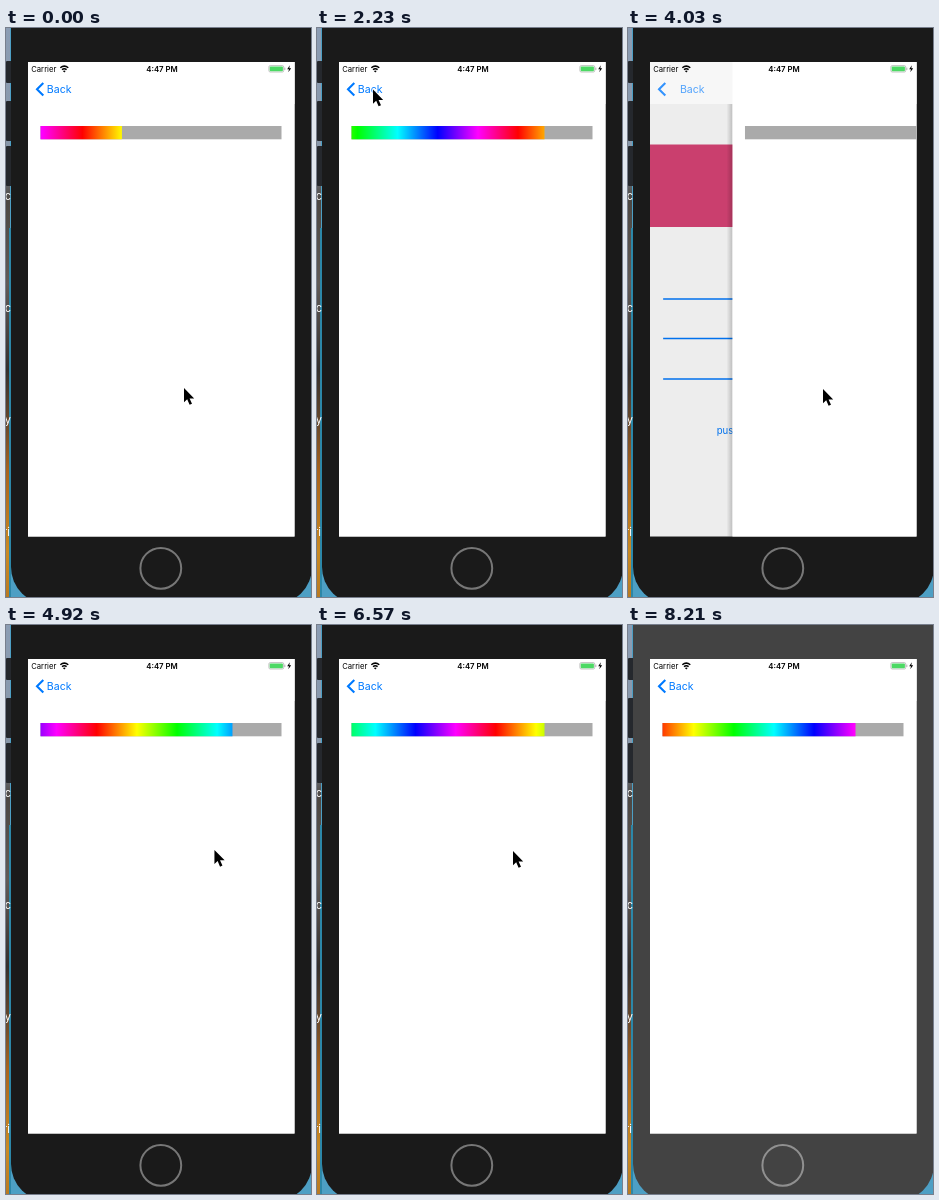
Animation, 305 px wide and 569 px high, one loop 8.25 s. Source, as an HTML page:

```html
<!DOCTYPE html>
<html lang="en">
<head>
<meta charset="utf-8">
<title>Rainbow progress bar</title>
<style>
  html, body { margin: 0; width: 100%; height: 100%; overflow: hidden; background: #1a1a1a; }
  svg { display: block; width: 305px; height: 569px; font-family: Inter, "Liberation Sans", sans-serif; }
  .tint { fill: #007aff; }
  .line { stroke: #007aff; fill: none; }
</style>
</head>
<body>
<svg viewBox="0 0 305 569">
  <defs>
    <linearGradient id="wall" x2="0" y2="1">
      <stop offset="0" stop-color="#8c9db4"/>
      <stop offset=".23" stop-color="#8796a8"/>
      <stop offset=".3" stop-color="#4c4743"/>
      <stop offset=".45" stop-color="#615b58"/>
      <stop offset=".6" stop-color="#35302e"/>
      <stop offset=".7" stop-color="#6b4a2c"/>
      <stop offset=".78" stop-color="#a8621d"/>
      <stop offset=".92" stop-color="#c98a24"/>
      <stop offset="1" stop-color="#b97a22"/>
    </linearGradient>
    <linearGradient id="edge">
      <stop offset="0" stop-opacity="0"/>
      <stop offset="1" stop-opacity=".2"/>
    </linearGradient>
    <linearGradient id="rainbow" gradientUnits="userSpaceOnUse" x1="0" x2="241" spreadMethod="repeat">
      <stop offset="0" stop-color="#f00"/>
      <stop offset=".16667" stop-color="#ff0"/>
      <stop offset=".33333" stop-color="#0f0"/>
      <stop offset=".5" stop-color="#0ff"/>
      <stop offset=".66667" stop-color="#00f"/>
      <stop offset=".83333" stop-color="#f0f"/>
      <stop offset="1" stop-color="#f00"/>
    </linearGradient>
    <clipPath id="screen"><rect x="22" y="34" width="266.5" height="474.5"/></clipPath>
  </defs>

  <!-- desktop behind the phone -->
  <rect width="305" height="569" fill="#4d9fc4"/>
  <rect width="4" height="569" fill="url(#wall)"/>
  <rect x="3" y="200" width="2" height="369" fill="#2c87a8"/>
  <g fill="#fff" font-size="11" text-anchor="end">
    <text x="5" y="172">c</text>
    <text x="5" y="284">c</text>
    <text x="5" y="396">y</text>
    <text x="4" y="508">ri</text>
  </g>
  <g fill="#25282d">
    <rect y="33" width="6" height="22" rx="1"/>
    <rect y="73" width="6" height="40" rx="1"/>
    <rect y="118" width="6" height="40" rx="1"/>
  </g>

  <rect id="body" x="5" y="-60" width="301" height="636" rx="37" fill="#1a1a1a"/>
  <circle id="home" cx="154.8" cy="540.3" r="20.4" fill="none" stroke="#777" stroke-width="2"/>

  <g clip-path="url(#screen)">
    <rect x="22" y="34" width="267" height="475" fill="#fff"/>
    <g id="root">
      <rect x="77" y="116.5" width="157" height="82.5" fill="#d94476"/>
      <path class="line" d="M90.5 271H220.5M90.5 310.5H220.5M90.5 351H220.5" stroke-width="1.4"/>
      <text class="tint" x="155.2" y="405.5" font-size="9.6" text-anchor="middle">push</text>
    </g>
    <rect id="dim" x="22" y="34" width="267" height="475"/>
    <rect x="22" y="34" width="267" height="42" fill="#f7f7f7"/>
    <g id="top">
      <rect id="shadow" x="16" y="76" width="6" height="433" fill="url(#edge)"/>
      <rect x="22" y="34" width="267" height="475" fill="#fff"/>
      <g transform="translate(34.5 98)">
        <rect width="241" height="13.3" fill="#aaa"/>
        <rect id="fill" height="13.3" fill="url(#rainbow)"/>
      </g>
    </g>

    <path id="chevron" class="line" d="M37.3 55L31 61.3L37.3 67.6" stroke-width="2.1"/>
    <text id="back" class="tint" x="40.8" y="65.2" font-size="10.6">Back</text>

    <text x="25.2" y="43.5" font-size="7.7">Carrier</text>
    <g fill="none" stroke="#000" stroke-width="1.5">
      <path d="M54.3 39.8Q58.3 36.4 62.3 39.8M56 41.7Q58.3 39.8 60.6 41.7"/>
    </g>
    <path d="M58.3 44.4L56.9 42.9Q58.3 41.9 59.7 42.9Z"/>
    <text x="156" y="43.6" font-size="7.8" font-weight="600" text-anchor="middle">4:47 PM</text>
    <rect x="262.9" y="37.6" width="14.8" height="6.4" rx="1.3" fill="#fff" stroke="#aaa" stroke-width=".7"/>
    <rect x="263.7" y="38.4" width="13.2" height="4.8" rx=".7" fill="#4cd964"/>
    <rect x="278.4" y="39.6" width=".9" height="2.4" fill="#aaa"/>
    <path d="M283.8 37.3L281.2 41.3H283L282.3 44.3L285.2 40.2H283.3Z"/>
  </g>

  <path id="cursor" d="M0 0V14.2L3.2 11.2L5.6 16.8L8 15.7L5.6 10.4H10.2Z"
        stroke="#fff" stroke-width="1.1" paint-order="stroke"/>
</svg>
<script>
  const LOOP = 8250, POP = 2914, PUSH = 3868, WIDTH = 267;
  const $ = id => document.getElementById(id);
  const el = {};
  for (const id of ['body', 'home', 'root', 'dim', 'top', 'shadow', 'fill', 'rainbow', 'chevron', 'back', 'cursor']) el[id] = $(id);

  const ticks = [0], brief = [3, 6, 27, 54];
  for (let i = 0; i < 55; i++) ticks.push(ticks[i] + (brief.includes(i) ? 140 : 150));
  const LAST = ticks[55];

  // Pointer stops: time, x, y
  const stops = [
    [0, 178, 360], [200, 178, 360], [1120, 56, 61.5], [3050, 56, 61.5],
    [3650, 152, 396], [3850, 154, 398], [4030, 195, 361], [4470, 216, 240],
    [5000, 208, 224], [5820, 196, 215], [6570, 196, 226], [6750, 200, 240],
    [7400, 245, 575], [LOOP, 245, 575]
  ];

  const clamp = v => Math.min(1, Math.max(0, v));
  const easeOut = p => 1 - (1 - clamp(p)) ** 3;
  const easeInOut = p => (1 - Math.cos(Math.PI * clamp(p))) / 2;
  const move = (node, x, y = 0) => node.setAttribute('transform', `translate(${x} ${y})`);

  function pointer(t) {
    const i = stops.findIndex(s => s[0] > t);
    const [t0, x0, y0] = stops[i - 1], [t1, x1, y1] = stops[i];
    const p = easeInOut((t - t0) / (t1 - t0));
    return [x0 + (x1 - x0) * p, y0 + (y1 - y0) * p];
  }

  function draw(t) {
    const second = t >= PUSH;
    const age = second ? t - PUSH : t + 750;
    const slid = easeOut((t - POP) / 500);
    const off = second ? 1 - easeOut(age / 500) : slid;

    // Navigation transition
    move(el.top, off * WIDTH);
    move(el.root, -0.3 * WIDTH * (1 - off));
    el.dim.setAttribute('opacity', 0.1 * (1 - off));
    el.shadow.setAttribute('opacity', off > 0 ? 1 : 0);
    move(el.back, off * (second ? 36 : 25));
    el.back.setAttribute('opacity', clamp(1 - off * (second ? 1.1 : 2.15)));
    el.chevron.setAttribute('opacity', clamp(1 - off * (second ? 0.7 : 1.8)));

    // Progress and hue drift
    const hue = 360 - age * (second ? 0.0798 : 0.0835);
    el.fill.setAttribute('width', 193 * easeInOut((age - 480) / 600));
    el.rainbow.setAttribute('gradientTransform', `translate(${-hue / 360 * 241} 0)`);

    move(el.cursor, ...pointer(t));

    const pale = t >= LAST;
    el.body.setAttribute('fill', pale ? '#434343' : '#1a1a1a');
    el.home.setAttribute('stroke', pale ? '#909090' : '#777');
  }

  function loop() {
    const t = performance.now() % LOOP;
    draw(ticks.findLast(s => s <= t));
    requestAnimationFrame(loop);
  }
  loop();
</script>
</body>
</html>
```
